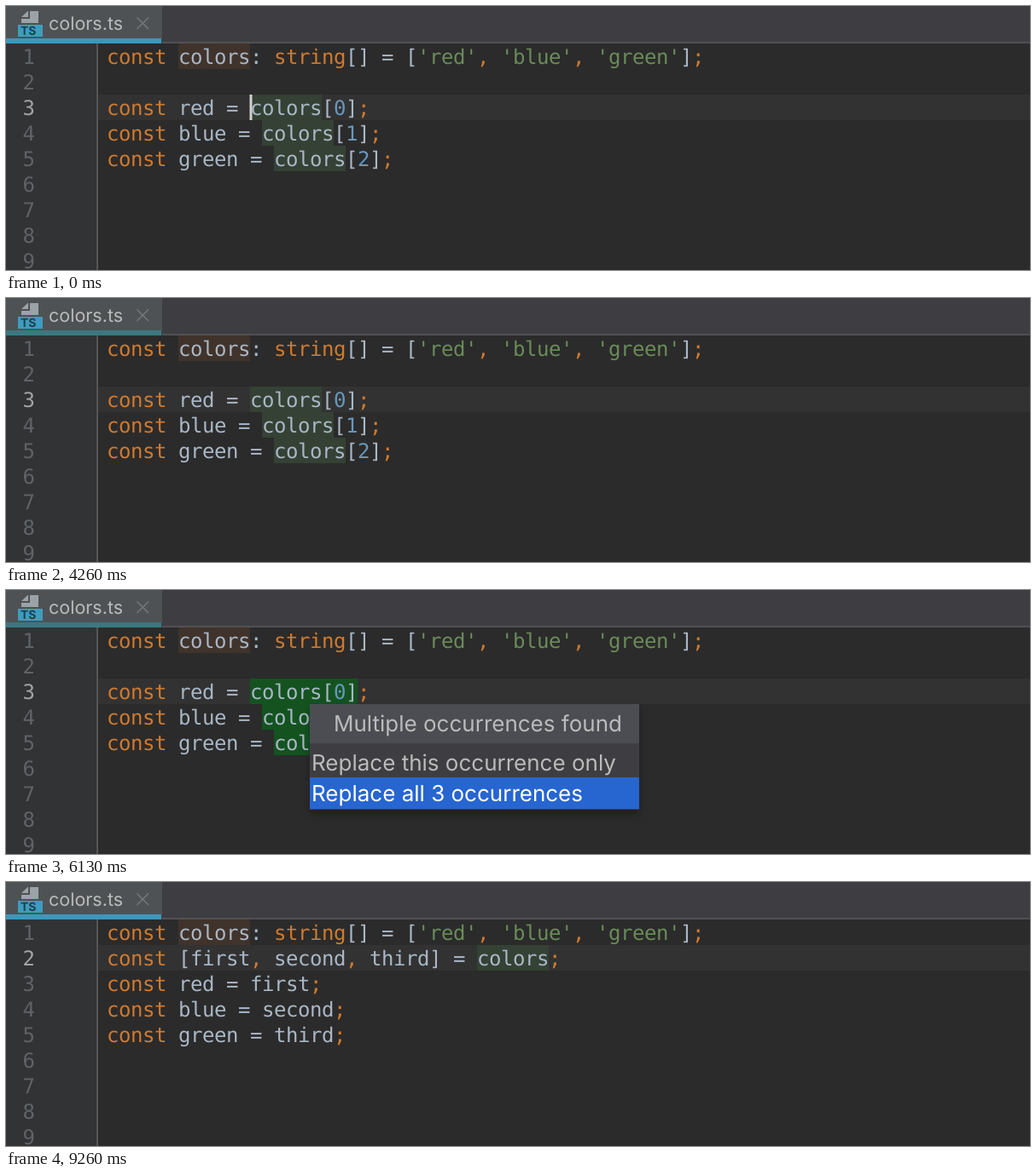
An HTML page that plays this animation: 1200x310 px, repeating every 9.66 s.

```html
<!DOCTYPE html>
<html lang="en">
<head>
<meta charset="utf-8">
<title>Array destructuring</title>
<style>
  html, body { margin: 0; width: 100%; height: 100%; overflow: hidden; background: #2b2b2b; }
  svg { display: block; width: 1200px; height: 310px; }
  text { white-space: pre; text-rendering: geometricPrecision; }
  .mono { font: 24px "DejaVu Sans Mono", monospace; letter-spacing: -0.45px; }
  .ui { font: 26px Inter, sans-serif; font-optical-sizing: none; fill: #bbbbbb; }
  .tab { font-size: 21.5px; }
  .white { fill: #fff; }
  .badge { font: bold 14px Inter, sans-serif; fill: #21404c; }
  .popup { filter: drop-shadow(0 5px 5px rgba(0, 0, 0, 0.3)); }
</style>
</head>
<body>
<svg id="stage" viewBox="0 0 1200 310"></svg>
<script>
const NS = 'http://www.w3.org/2000/svg';
const LOOP = 9660, CELL = 14, ROW = 30, LEFT = 118, TOP = 44, BASELINE = 24;
const C = {
  plain: '#a9b7c6', keyword: '#cf7a30', string: '#6a8c58', number: '#6897bb',
  dim: '#344134', hot: '#145320', write: '#40332b',
  bar: '#3e3e42', blue: '#2765d0'
};
const stage = document.getElementById('stage');
const layers = {};

function add(parent, tag, attrs, content) {
  const el = document.createElementNS(NS, tag);
  for (const key in attrs) el.setAttribute(key, attrs[key]);
  if (content) el.textContent = content;
  return parent.appendChild(el);
}
const rect = (parent, x, y, width, height, fill) =>
  add(parent, 'rect', { x, y, width, height, fill });
const path = (parent, d, fill) => add(parent, 'path', { d, fill });
const text = (parent, x, y, content, cls) => add(parent, 'text', { x, y, class: cls }, content);
const layer = (name, cls = '') => layers[name] = add(stage, 'g', { class: cls });
const rowTop = line => TOP + (line - 1) * ROW;

function mark(parent, line, column, length, fill) {
  rect(parent, LEFT + column * CELL, rowTop(line), length * CELL, ROW, fill);
}

function tokenColor(token) {
  if (/^(const|string|[,;])$/.test(token)) return C.keyword;
  if (token[0] === "'") return C.string;
  return /^\d/.test(token) ? C.number : C.plain;
}

function code(parent, line, source) {
  const el = text(parent, LEFT, rowTop(line) + BASELINE, '', 'mono');
  for (const m of source.matchAll(/'\w+'|\w+|[^\s\w]/g)) {
    add(el, 'tspan', { x: LEFT + m.index * CELL, fill: tokenColor(m[0]) }, m[0]);
  }
}

function lineNumber(parent, line, fill) {
  text(parent, 19.5, rowTop(line) + BASELINE, String(line), 'mono').setAttribute('fill', fill);
}

function currentLine(parent, line) {
  rect(parent, 108, rowTop(line), 1092, ROW, '#323232');
  rect(parent, 10, rowTop(line), 40, ROW, '#313335');
  lineNumber(parent, line, '#a4a3a3');
}

// Tab bar
rect(stage, 0, 0, 1200, 44, C.bar);
rect(stage, 183, 42, 1017, 2, '#515154');
rect(stage, 0, 0, 183, 38, '#4e5254');
path(stage, 'M28 6H38V20H18V15H28Z M18 13L26 5.500V13Z', '#9ba2a8');
rect(stage, 14, 22, 29, 14, '#3d9cbf');
text(stage, 17, 34, 'TS', 'badge');
text(stage, 50, 28, 'colors.ts', 'ui tab');
add(stage, 'path', { d: 'M153.500 13.500L167 27M167 13.500L153.500 27', stroke: '#73777a', 'stroke-width': 1.6 });
rect(stage, 0, 38, 182, 6, '#3a7880');
rect(layer('focus'), 0, 38, 182, 6, '#3d97bd');

// Editor
rect(stage, 0, 44, 106, 266, '#313335');
rect(stage, 108, 44, 1092, 266, '#2b2b2b');
for (let n = 1; n <= 9; n++) lineNumber(stage, n, '#606366');
currentLine(layer('before'), 3);
currentLine(layer('after'), 2);
rect(stage, 106, 44, 2, 266, '#555555');
mark(stage, 1, 6, 6, C.write);

const names = ['red', 'blue', 'green'];
const columns = names.map(name => name.length + 9);
const marks = (name, lines, length, fill) => {
  const group = layer(name);
  for (const n of lines) mark(group, n, columns[n - 3], length, fill);
};
marks('dim', [3, 4, 5], 6, C.dim);
marks('hotOne', [3], 9, C.hot);
marks('hotRest', [4, 5], 9, C.hot);
mark(layer('dimNew'), 2, 31, 6, C.dim);

code(stage, 1, "const colors: string[] = ['red', 'blue', 'green'];");
const oldCode = layer('oldCode'), newCode = layer('newCode');
code(newCode, 2, 'const [first, second, third] = colors;');
names.forEach((name, i) => {
  code(oldCode, i + 3, `const ${name} = colors[${i}];`);
  code(newCode, i + 3, `const ${name} = ${['first', 'second', 'third'][i]};`);
});
rect(layer('caret'), 285.5, 104, 3, ROW, '#d0d0d0');
rect(layer('caretNew'), 635.5, 74, 3, ROW, '#d0d0d0');

// Intention menu
const menu = layer('menu', 'popup');
rect(menu, 286, 134, 498, 80, C.bar);
rect(menu, 286, 136, 498, 38, C.blue);
['Introduce array destructuring', 'Replace with array destructuring'].forEach((label, i) => {
  const item = add(menu, 'g', { transform: `translate(0 ${i * 38})` });
  path(item, 'M306 146H323V148.400H306Z M306 151H318V153.400H306Z M306 156H313V158.400H306Z', '#a4a8ae');
  path(item, 'M313 164L314.500 158.500L323 150L327 154L318.500 162.500Z M324.300 148.700L326.500 146.500L330.500 150.500L328.300 152.700Z', '#a4a8ae');
  text(item, 340, 164, label, i ? 'ui' : 'ui white');
  path(item, 'M752 146.500L764 154L752 161.500Z', i ? '#9a9a9c' : '#ffffff');
});

// Occurrence chooser
const chooser = layer('chooser', 'popup');
rect(chooser, 356, 134, 386, 124, C.bar);
rect(chooser, 356, 134, 386, 46, '#4b4d53');
text(chooser, 384, 166, 'Multiple occurrences found', 'ui');
const options = ['Replace this occurrence only', 'Replace all 3 occurrences'];
options.forEach((label, i) => text(chooser, 358, 212 + i * 36, label, 'ui'));
options.forEach((label, i) => {
  const pick = layer('pick' + i);
  rect(pick, 356, 184 + i * 36, 386, i ? 37 : 36, C.blue);
  text(pick, 358, 212 + i * 36, label, 'ui white');
});

// Visible layers from each time on
const OLD = 'before oldCode dim ', NEW = 'after newCode focus ';
const steps = [
  [0, OLD + 'focus caret'],
  [230, OLD + 'focus'],
  [730, OLD + 'focus caret'],
  [1230, OLD + 'focus'],
  [1730, OLD + 'focus caret'],
  [2230, OLD + 'focus'],
  [2700, OLD + 'menu'],
  [4260, OLD],
  [4330, OLD + 'hotOne chooser pick0'],
  [6130, OLD + 'hotOne hotRest chooser pick1'],
  [8200, OLD + 'hotOne hotRest'],
  [8230, OLD + 'focus'],
  [8260, NEW + 'caretNew'],
  [8530, NEW + 'dimNew caretNew'],
  [9260, NEW + 'dimNew']
].map(([at, list]) => [at, new Set(list.trim().split(' '))]);

let shown = null;
const start = performance.now();
function draw() {
  const t = (performance.now() - start) % LOOP;
  const visible = steps.findLast(([at]) => at <= t)[1];
  if (visible !== shown) {
    shown = visible;
    for (const name in layers) layers[name].style.display = visible.has(name) ? '' : 'none';
  }
  requestAnimationFrame(draw);
}
draw();
</script>
</body>
</html>
```
